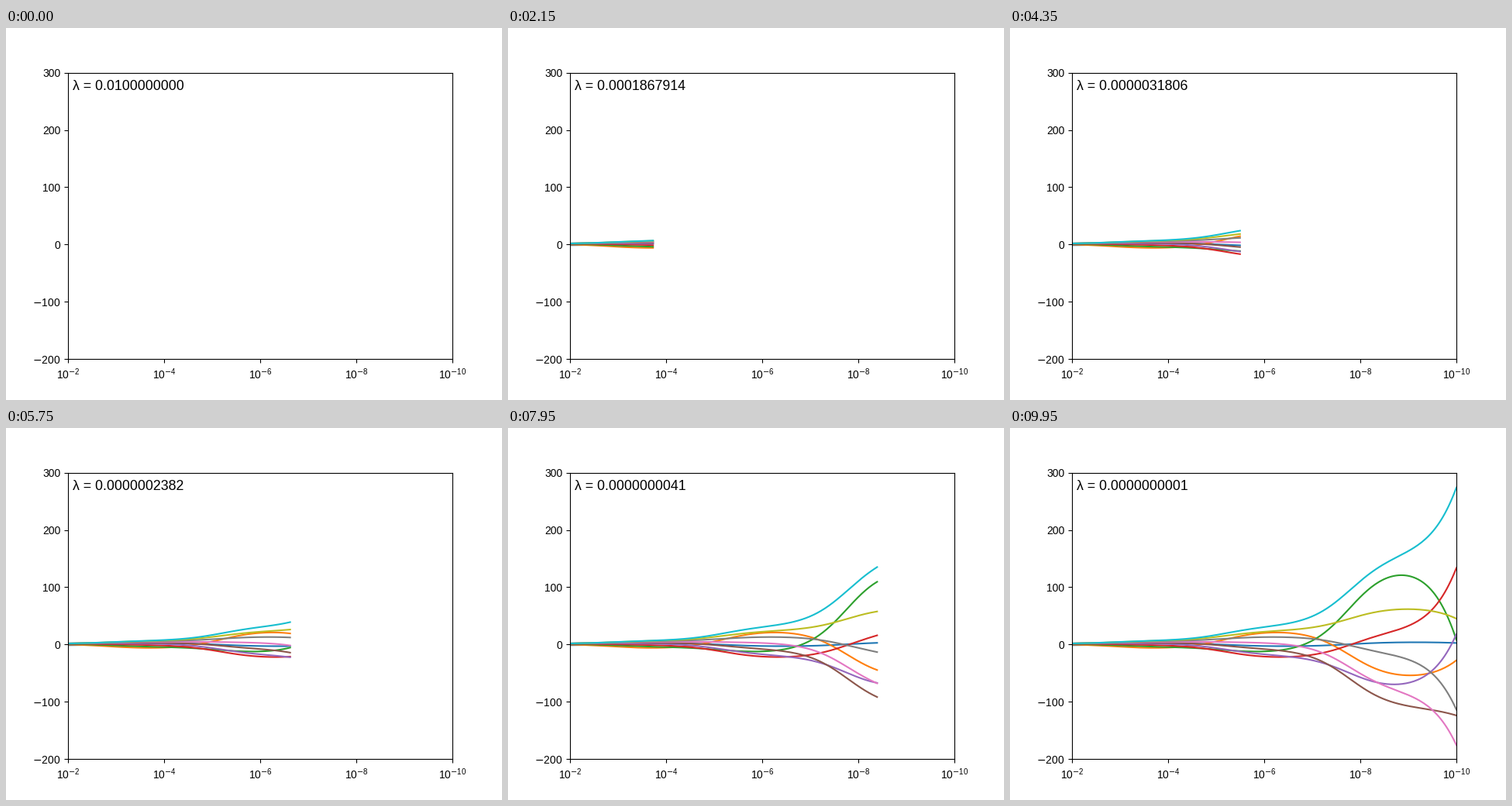
Animation of 640 by 480 pixels, one loop 10 s. Source, as a matplotlib script:

```python
import numpy as np
import matplotlib.pyplot as plt
from matplotlib.animation import FuncAnimation

STEPS = 200
INTERVAL = 50

plt.rcParams["font.family"] = "Liberation Sans"


def ridge_path(alphas):
    """Ridge coefficients of the 10x10 Hilbert system, one row per alpha."""
    n = np.arange(10)
    X = 1.0 / (n[:, None] + n + 1)
    gram, rhs = X.T @ X, X.T @ np.ones(10)
    return np.array([np.linalg.solve(gram + a * np.eye(10), rhs) for a in alphas])


def signed_label(v):
    return f"$-${-v}" if v < 0 else str(v)


def power_label(p):
    return rf"$\mathdefault{{10}}^{{-\mathdefault{{{p}}}}}$"


exponents = np.linspace(2, 10, STEPS)
alphas = 10.0 ** -exponents
coefs = ridge_path(alphas)

fig, ax = plt.subplots(figsize=(6.4, 4.8), dpi=100)
ax.set_xlim(2, 10)
ax.set_ylim(-200, 300)
powers = range(2, 11, 2)
levels = range(-200, 301, 100)
ax.set_xticks(powers, [power_label(p) for p in powers])
ax.set_yticks(levels, [signed_label(v) for v in levels])

lines = [ax.plot([], [], lw=1.5)[0] for _ in range(10)]
label = fig.text(86 / 640, 400 / 480, "", fontsize=12.8, va="baseline")


def update(i):
    for line, path in zip(lines, coefs.T):
        line.set_data(exponents[:i + 1], path[:i + 1])
    label.set_text(f"λ = {alphas[i]:.10f}")
    return [*lines, label]


anim = FuncAnimation(fig, update, frames=STEPS, interval=INTERVAL,
                     repeat=True, repeat_delay=0)
plt.show()
```
